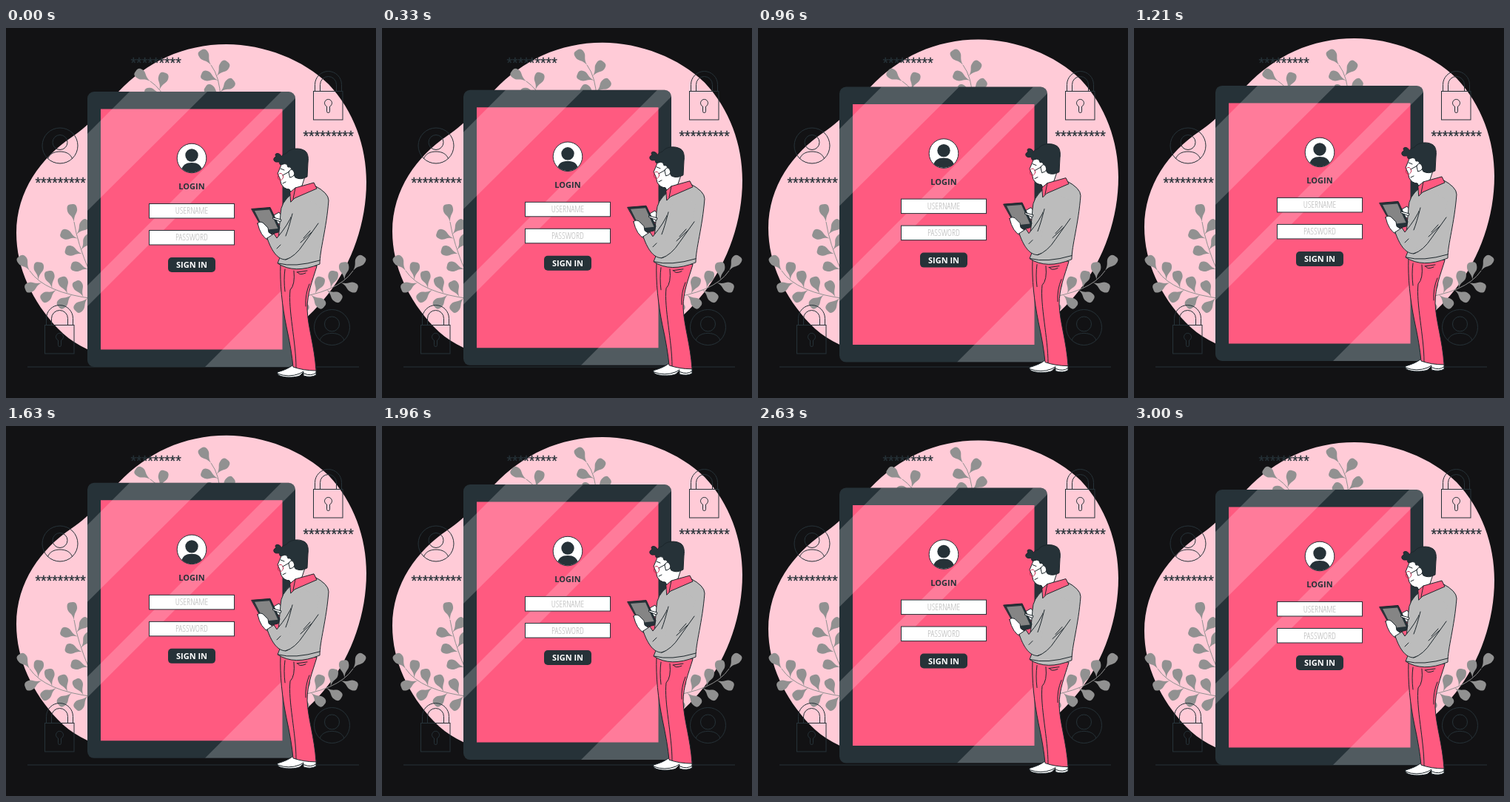
An HTML page that plays this animation: 500x500 px, repeating every 3.04 s.

```html
<!DOCTYPE html>
<html>
<head>
<meta charset="utf-8">
<style>
html, body { margin: 0; width: 100%; height: 100%; overflow: hidden; background: #121214 }
svg { display: block; width: 100vw; height: 100vh }
.line { fill: none; stroke: #263238; stroke-width: 1 }
.ink { stroke: #1c262b; stroke-linejoin: round; stroke-linecap: round }
.stars { font: 19.5px "Liberation Sans", Arial, sans-serif; fill: #263238; stroke: #263238; stroke-width: .3 }
.ui { font: 700 11px "Open Sans", "Noto Sans", sans-serif; font-stretch: 75%; text-anchor: middle }
.hint { font-size: 12px; font-weight: 300; fill: #b4b4b4 }
.stem { fill: none; stroke: #919191 }
</style>
</head>
<body>
<svg viewBox="0 0 500 500">
  <defs>
    <clipPath id="case"><rect x="110" y="86" width="281" height="372" rx="9"/></clipPath>
    <clipPath id="disc"><circle cx="251" cy="176" r="19.5"/></clipPath>
    <g id="lock" class="line">
      <rect x="-20" width="39.5" height="38.5"/>
      <path d="M-18 0V-9a18 18 0 0 1 36 0V0M-11 0V-9a11 11 0 0 1 22 0V0"/>
      <path d="M-2 20.500a5 5 0 1 1 4 0V27a2 2 0 0 1-4 0z"/>
    </g>
    <g id="user" class="line">
      <circle r="24"/>
      <circle cy="-4.500" r="10"/>
      <path d="M-16.500 17.500C-14 11-8 8 0 8S14 11 16.500 17.500"/>
    </g>
  </defs>

  <path class="float" fill="#ffcbd7" d="M298 22C349 22 402 43 436 76 470 112 487 160 487 208 487 262 468 318 435 360 405 398 350 450 240 455 180 458 110 448 70 406 36 370 14 325 14 277 14 220 48 175 88 148 118 128 130 108 152 86 190 46 240 22 298 22Z"/>

  <!-- stems run from tip to root -->
  <g fill="#919191">
    <g><path class="stem" d="M277 50Q289 66 290 96"/></g>
    <g><path class="stem" d="M195 72Q210 82 218 102"/></g>
    <g><path class="stem" d="M92 262Q96 290 114 332"/></g>
    <g id="branch"><path class="stem" d="M32 328Q52 358 120 366"/></g>
    <use href="#branch" transform="translate(501) scale(-1 1)"/>
  </g>

  <path class="line" d="M29 458H477"/>
  <use href="#lock" x="435.500" y="85.500"/>
  <use href="#lock" x="72.500" y="401.500"/>
  <use href="#user" x="73" y="159"/>
  <use href="#user" x="440.500" y="404.500"/>
  <g class="stars">
    <text x="168.500" y="53.500">*********</text>
    <text x="39.500" y="215.500">*********</text>
    <text x="401.500" y="152.500">*********</text>
  </g>

  <!-- login tablet -->
  <g class="float">
    <rect x="110" y="86" width="281" height="372" rx="9" fill="#263238"/>
    <path fill="#ff5a80" d="M128 109.500H373.500V434.500H128z"/>
    <path clip-path="url(#case)" fill="#fff" opacity=".2" d="M167 86H272L110 247V143zM372 86H400L110 376V348zM269 458L391 336V458z"/>
    <circle cx="251" cy="176" r="19.800" fill="#fff" stroke="#263238"/>
    <g clip-path="url(#disc)" fill="#263238">
      <circle cx="251" cy="172" r="8.700"/>
      <path d="M236 197C237 185 243 182 251 182S265 185 266 197z"/>
    </g>
    <g fill="#fff" stroke="#263238">
      <rect x="193.500" y="237.500" width="115" height="19.500"/>
      <rect x="193.500" y="273.500" width="115" height="19.500"/>
    </g>
    <rect x="219" y="310" width="64" height="20" rx="5" fill="#263238"/>
    <g class="ui">
      <text x="251" y="218" fill="#263238">LOGIN</text>
      <text x="251" y="251.500" class="hint">USERNAME</text>
      <text x="251" y="287.500" class="hint">PASSWORD</text>
      <text x="251" y="324" fill="#fff">SIGN IN</text>
    </g>
  </g>

  <!-- man with a pad -->
  <g class="float ink">
    <!-- shoes and trousers -->
    <path fill="#fff" d="M387 456Q381 461 367 465C364 472 386 474 397 470L402 465V470Q412 473 419 469V460z"/>
    <path fill="none" d="M367 467Q382 473 397 467L402 464M403 467Q412 471 419 466"/>
    <path fill="#ff5a80" d="M371 320C370 345 373 375 379 404Q386 436 388 458 402 463 419 463C417 430 408 405 407 380 407 358 414 342 420 322z"/>
    <path fill="none" d="M377 326Q375 340 377 356M389 328Q391 347 384 354C381 380 392 425 392 459M393 330L407 328M394 330Q396 335 405 331M410 346Q404 360 405 376"/>

    <!-- sweater, pad, hands and near arm -->
    <path fill="#fff" d="M360 254L369 249 374 256 370 265 362 263z"/>
    <path fill="#bcbcbc" d="M386 224Q371 236 371 251L368 287Q374 305 367 318 390 333 424 319C424 300 433 272 436 233Q436 223 417 213z"/>
    <path fill="#263238" d="M332 244.500L357 242.500 370 270 368 276 352 280z"/>
    <path fill="#858585" stroke="none" d="M336 247L356 245.500 367.500 271 349 273z"/>
    <path fill="#fff" d="M361 256L372 259 371 262 361 258z"/>
    <path fill="#fff" d="M340 264Q342 261 347 263L354 270 355 276 362 281 355 287Q344 282 340 264z"/>
    <path fill="#bcbcbc" d="M353 284L362 278 366 284Q382 265 387 251L405 286Q390 311 378 313C366 313 358 299 353 284z"/>
    <path fill="#bcbcbc" stroke="none" d="M385 251L401 229 424 240 417 276 395 311 380 312 384 284z"/>
    <path fill="none" d="M387 251Q382 271 378 281M378 313Q391 309 402 292L422 264M398 290L413 276M402 284L411 274M368 318Q390 324 424 314M366 298L371 293"/>

    <!-- head -->
    <path fill="#fff" d="M374 180L367 197 370 203 372 211Q376 218 383 218L386 224 400 213 406 195z"/>
    <path fill="#ff5a80" d="M384 222L391 216 416 209 420 217 390 230 385 235z"/>
    <path fill="none" d="M391 216L388 231"/>
    <path fill="#263238" d="M374 184C367 187 372 180 367 181 361 182 360 175 365 174 361 167 372 169 372 174 375 169 378 171 380 168 385 162 397 162 402 165 408 167 409 175 408 182L407 201Q398 206 391 202L386 193Q386 187 381 188 380 182 374 184z"/>
    <path fill="#fff" d="M382 194Q386 188 389 194T384 202z"/>
    <g fill="none">
      <ellipse cx="371" cy="201" rx="3.600" ry="4.500" stroke="#c32f52"/>
      <path d="M374 199L383 194M371 190L376 192M374 210L378 208"/>
    </g>
  </g>
</svg>
<script>
const LEAF = 'M0 0C.45-.05 .4-.28 .72-.28S1-.1 1 0 1 .28 .72 .28 .45 .05 0 0';
const LEAF_SIZE = 24, SPREAD = 55, FIRST = 17, GAP = 22, STAGGER = 6;

// Grows a leaf at a distance along the stem, turned away from its direction.
function grow(stem, distance, turn) {
  const { x, y } = stem.getPointAtLength(distance);
  const root = stem.getPointAtLength(distance + 3);
  const angle = Math.atan2(y - root.y, x - root.x) * 180 / Math.PI + turn;
  const leaf = document.createElementNS('http://www.w3.org/2000/svg', 'path');
  leaf.setAttribute('d', LEAF);
  leaf.setAttribute('transform', `translate(${x} ${y}) rotate(${angle}) scale(${LEAF_SIZE})`);
  stem.parentNode.append(leaf);
}

for (const stem of document.querySelectorAll('.stem')) {
  grow(stem, 0, 0);
  for (let d = FIRST; d < stem.getTotalLength() - STAGGER; d += GAP) {
    grow(stem, d, SPREAD);
    grow(stem, d + STAGGER, -SPREAD);
  }
}

const LOOP = 3040, HALF = 1500, RISE = 10;
const floats = document.querySelectorAll('.float');
function draw(now) {
  const t = Math.min(now % LOOP, 2 * HALF);
  const lift = RISE * (1 - Math.abs(t / HALF - 1));
  floats.forEach(el => el.setAttribute('transform', `translate(0 ${-lift})`));
  requestAnimationFrame(draw);
}
draw(performance.now());
</script>
</body>
</html>
```
